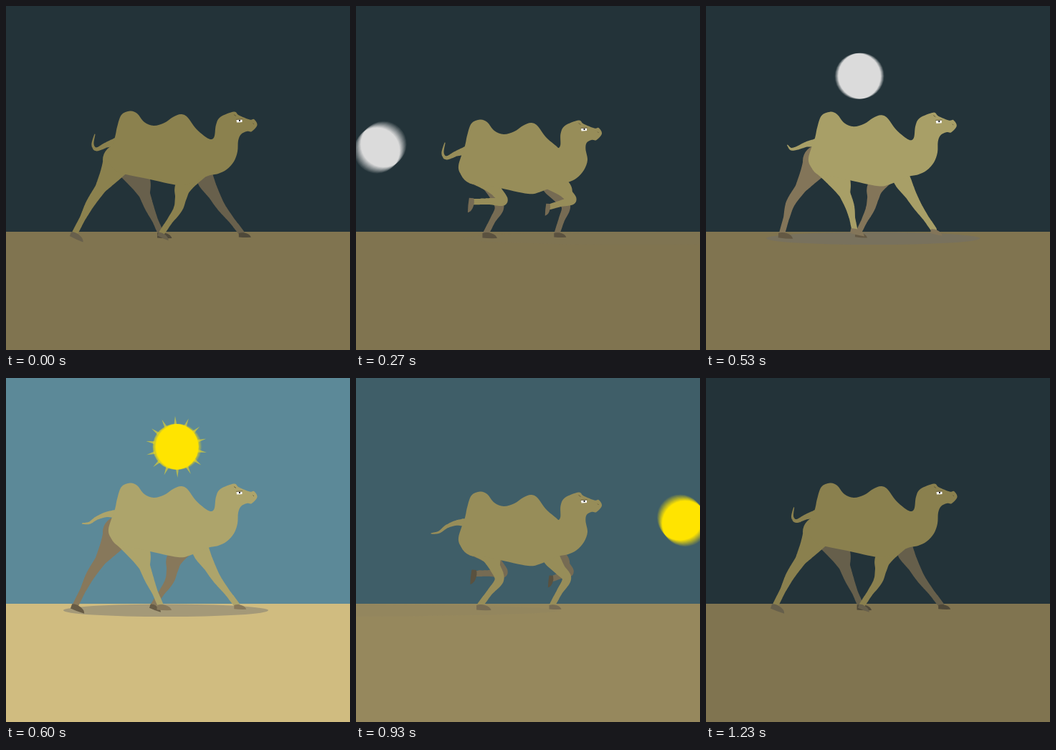
These frames come from a looping animation (480 by 480 pixels, 1.26 s). An HTML page with a canvas:

```html
<!DOCTYPE html>
<html lang="en">
<head>
<meta charset="utf-8">
<title>Walking camel</title>
<style>
  html, body { margin: 0; width: 100%; height: 100%; overflow: hidden; background: #233339; }
  canvas { display: block; width: 100vmin; height: 100vmin; }
</style>
</head>
<body>
<canvas id="stage" width="480" height="480"></canvas>
<script>
const LOOP = 1260, SIZE = 480, TAU = Math.PI * 2;
const DAWN = 568, NOON = 600; // the moon becomes the sun at dawn
const ctx = document.getElementById('stage').getContext('2d');
const layer = document.createElement('canvas');
layer.width = layer.height = SIZE;
const blur = layer.getContext('2d');

const BODY = [
  [143, 211], [152, 183], [155, 169], [161, 152], [173, 146.5], [183, 150], [193, 162],
  [206, 167], [221, 163], [233, 155], [244, 151], [253, 155], [265, 171], [279, 183],
  [287, 186], [291, 181], [293, 166], [299, 155], [318, 147.5], [325, 152.5], [340, 158.5],
  [346, 158], [350.5, 166], [343, 175], [336, 175], [328, 179], [324, 188], [323, 203],
  [318, 217], [308, 228], [296, 234], [282, 237], [258, 247], [240, 250], [197, 241],
  [160, 233], [148, 225]];
const TAIL_LOW = [[141, 190], [127, 195], [116, 203], [105, 205]];
const TAIL_CURLED = [[140, 194], [126, 200], [121, 193], [124, 179]];

const clamp = u => Math.min(1, Math.max(0, u));
const smooth = u => (u = clamp(u)) * u * (3 - 2 * u);
const mix = (a, b, u) => a.map((v, i) => v + (b[i] - v) * u);
const middle = (a, b) => mix(a, b, 0.5);
const rgb = c => `rgb(${c.map(Math.round)})`;

// Legs swing around a base pose; trail = stretched back, lift = folded in the air.
const HIND = {
  radii: [22, 15, 8, 6.4, 4.2, 4], hoof: 1,
  pose: (c, trail, lift, drop) => [
    [167 - 10 * trail, 215 + drop],
    [186 - 39 * trail, 243 - 11 * trail],
    [200 - 82 * trail + 5 * lift, 281 - 6 * trail - 9 * lift],
    [156 - 60 * c + 13 * (1 - c * c) + 40 * lift * c, 317 - 44 * lift]]
};
const FORE = {
  radii: [13, 11.5, 8, 6.2, 4.3, 3.8], hoof: 0.83,
  pose: (c, trail, lift, drop) => [
    [268, 230 + drop],
    [274 - 26 * trail + 14 * lift, 246 + 5 * trail + 0.6 * drop],
    [294 - 54 * trail + 7 * lift, 280 + 3 * trail - 9 * lift],
    [270 - 53 * c + 12 * lift, 317 - 37 * lift]]
};

function spline(a, b, c, d, u) {
  return b + u / 2 * (c - a + u * (2 * a - 5 * b + 4 * c - d + u * (3 * (b - c) + d - a)));
}

// A smooth limb through joints, each with its own radius.
function limb(joints, radii, color) {
  const last = joints.length - 1;
  ctx.fillStyle = color;
  ctx.beginPath();
  for (let i = 0; i < last; i++) {
    const [a, b, c, d] = [-1, 0, 1, 2].map(o => joints[Math.min(last, Math.max(0, i + o))]);
    for (let u = 0; u <= 1; u += 1 / 32) {
      const [x, y] = [0, 1].map(k => spline(a[k], b[k], c[k], d[k], u));
      const r = radii[i] + (radii[i + 1] - radii[i]) * u;
      ctx.moveTo(x + r, y);
      ctx.arc(x, y, r, 0, TAU);
    }
  }
  ctx.fill();
}

function leg(part, phase, drop, color, hoofColor, far) {
  const c = Math.cos(phase);
  const lift = smooth(Math.max(0, Math.sin(phase)) ** 2);
  const trail = smooth((Math.cos(phase + 0.2) - 0.35) / 0.6);
  const push = Math.max(0, c) ** 16;
  const [hip, thigh, knee, ankle] = part.pose(c, trail, lift, drop);
  ctx.save();
  if (far && part === FORE) ctx.translate(-3 - 9 * c, 0); // the far shoulder swings wider
  limb([hip, thigh, middle(thigh, knee), knee, middle(knee, ankle), ankle], part.radii, color);
  ctx.translate(...ankle);
  ctx.rotate(1.65 * lift + 0.4 * push);
  ctx.scale(part.hoof, part.hoof);
  ctx.fillStyle = hoofColor;
  ctx.fill(new Path2D('M-5 0Q1 -2 7 0Q14 2 15.5 7Q5 7.5 -5 6.5Z'));
  ctx.restore();
}

function body(drop, shift, color) {
  const pts = BODY.map(([x, y]) =>
    [x + (x > 286 ? shift * clamp((200 - y) / 25) : 0), y + drop]);
  const n = pts.length, at = i => pts[(i + n) % n];
  ctx.fillStyle = color;
  ctx.beginPath();
  ctx.moveTo(...pts[0]);
  for (let i = 0; i < n; i++) {
    const [a, b, c, d] = [at(i - 1), at(i), at(i + 1), at(i + 2)];
    ctx.bezierCurveTo(b[0] + (c[0] - a[0]) / 6, b[1] + (c[1] - a[1]) / 6,
      c[0] - (d[0] - b[0]) / 6, c[1] - (d[1] - b[1]) / 6, ...c);
  }
  ctx.fill();
}

function face(drop, shift) {
  ctx.save();
  ctx.translate(shift, drop);
  ctx.fillStyle = '#fff';
  ctx.fill(new Path2D('M321.5 158.8L329.5 158.4V162L322 162.6Z'));
  ctx.fillStyle = '#222';
  ctx.fillRect(325, 158.8, 2, 2.2);
  ctx.strokeStyle = '#5d5435';
  ctx.lineWidth = 0.8;
  ctx.stroke(new Path2D('M321 158.4L330 157.8M318 151.5L321 153.5M344.5 163.5L346 165'));
  ctx.restore();
}

function lightAt(t) {
  const d = (t - NOON) / 330;
  return [237 + (d < 0 ? -204 * (-d) ** 1.4 : 218 * d), 96 + 102 * Math.abs(d) ** 2.6];
}

function light(t) {
  const day = t >= DAWN, samples = 15;
  const [x, y] = lightAt(t);
  if (x < -50 || x > SIZE + 50) return;
  const shine = day ? clamp(1 - Math.abs(t - NOON) / 120) : 0;
  ctx.fillStyle = `rgba(225,210,50,${0.65 * shine})`;
  for (let i = 0; i < 14; i++) {
    ctx.save();
    ctx.translate(x, y);
    ctx.rotate(i * TAU / 14 - 0.04);
    ctx.fill(new Path2D('M-2 -31L0 -43L2 -31Z'));
    ctx.restore();
  }
  // Average discs along the path for motion blur, then tint them.
  blur.clearRect(0, 0, SIZE, SIZE);
  blur.globalCompositeOperation = 'lighter';
  blur.globalAlpha = 1 / samples;
  for (let i = 0; i < samples; i++) {
    blur.beginPath();
    blur.arc(...lightAt(t + (i / (samples - 1) - 0.5) * 11), 32, 0, TAU);
    blur.fill();
  }
  blur.globalCompositeOperation = 'source-in';
  blur.globalAlpha = 1;
  blur.fillStyle = day ? '#ffe400' : '#dbdbdb';
  blur.fillRect(0, 0, SIZE, SIZE);
  ctx.drawImage(layer, 0, 0);
}

function shadow(t) {
  const d = (t - NOON) / 330, reach = Math.abs(d) ** 1.8;
  const left = 80 + reach * (d < 0 ? 70 : -500);
  const right = 366 + reach * (d < 0 ? 274 : -81);
  ctx.fillStyle = `rgba(110,110,110,${0.45 * smooth(1.25 - Math.abs(d))})`;
  ctx.beginPath();
  ctx.ellipse((left + right) / 2, 324.3, (right - left) / 2, 8.8, 0, 0, TAU);
  ctx.fill();
}

function draw(t) {
  const phase = TAU * t / LOOP;
  const daylight = (from, to) => t < DAWN ? 0 : smooth((to - t) / (to - from));
  const glow = clamp(1 - Math.abs(t - NOON) / 630);
  const near = rgb(mix([138, 128, 78], [173, 164, 107], glow ** 1.35));
  const farTone = mix([102, 95, 75], [135, 120, 91], glow);
  const far = rgb(farTone), farHoof = rgb(farTone.map(v => v * 0.76));
  const drop = 12 * smooth((Math.sin(phase) ** 2 - 0.1) / 0.65);
  const headShift = -0.62 * drop;

  ctx.fillStyle = rgb(mix([35, 51, 57], [92, 137, 152], daylight(790, 1070)));
  ctx.fillRect(0, 0, SIZE, SIZE);
  light(t);
  ctx.fillStyle = rgb(mix([128, 116, 80], [208, 188, 128], daylight(780, 1010)));
  ctx.fillRect(0, 315, SIZE, 165);
  shadow(t);

  for (const part of [HIND, FORE]) leg(part, phase + Math.PI, drop, far, farHoof, true);
  for (const part of [HIND, FORE]) leg(part, phase, drop, near, far, false);

  const curl = smooth(0.5 + 0.9 * Math.cos(phase - TAU / 6));
  const tail = TAIL_LOW.map((p, i) => mix(p, TAIL_CURLED[i], curl));
  limb([[153, 190], ...tail].map(([x, y]) => [x, y + drop]), [6, 3.6, 2.4, 1.7, 0.6], near);
  body(drop, headShift, near);
  face(drop, headShift);
}

function tick() {
  draw(performance.now() % LOOP);
  requestAnimationFrame(tick);
}
tick();
</script>
</body>
</html>
```
